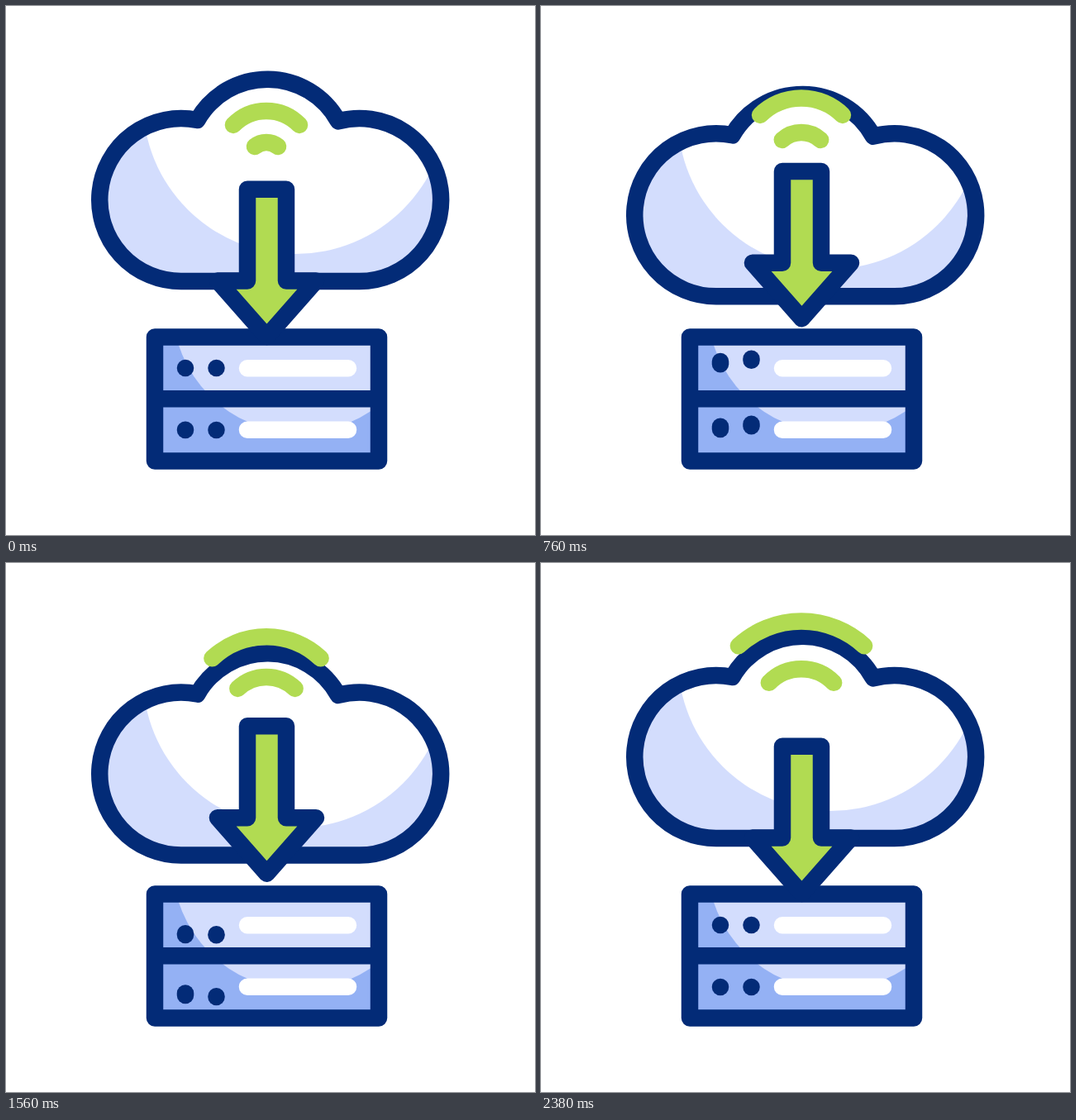
An HTML page that plays this animation: 640x640 px, repeating every 2400 ms.

```html
<!DOCTYPE html>
<html lang="en">
<head>
<meta charset="utf-8">
<title>Cloud download</title>
<style>
  html, body { margin: 0; width: 100%; height: 100%; overflow: hidden; background: #fff; }
  svg { display: block; width: 100vw; height: 100vh; }
  .line { fill: none; stroke: #032b77; stroke-width: 20.5; stroke-linejoin: round; stroke-linecap: round; }
  .white { stroke: #fff; }
  .green { stroke: #b1db52; }
  .light { fill: #d3ddfd; }
  .dark { fill: #94b1f4; }
</style>
</head>
<body>
<svg viewBox="0 0 640 640">
  <defs>
    <path id="outline" d="M212.5 333A98.5 98.5 0 1 1 231.5 138A97.7 97.7 0 0 1 402 139.4A98.5 98.5 0 1 1 427.5 333Z"/>
    <clipPath id="inCloud"><use href="#outline"/></clipPath>
    <clipPath id="inServer"><path d="M180 400.5H451V550.5H180Z"/></clipPath>
  </defs>

  <g id="cloud">
    <g clip-path="url(#inCloud)">
      <rect class="light" x="100" y="70" width="440" height="280"/>
      <circle cx="350" cy="115.6" r="184.4" fill="#fff"/>
    </g>
    <use href="#outline" class="line"/>
  </g>

  <path id="outerWave" class="line green"/>
  <path id="innerWave" class="line green"/>

  <g clip-path="url(#inServer)">
    <rect class="dark" x="180" y="400" width="271" height="151"/>
    <circle class="light" cx="355" cy="363" r="153.5"/>
  </g>
  <path class="line" d="M180 400.5H451V550.5H180ZM180 475.3H451"/>
  <path class="line white" d="M292 438.2H414M292 512.7H414"/>
  <g id="dots"></g>

  <path id="arrow" class="line" style="fill:#b1db52"
        d="M292 221.7H339V332.5H375L315.5 400L256 332.5H292Z"/>
</svg>
<script>
const LOOP = 2400, BEAT = 600, SMEAR = 40;
const $ = id => document.getElementById(id);
const clamp = x => Math.min(1, Math.max(0, x));
const mix = (a, b, p) => a + (b - a) * p;

// Closed form of cubic-bezier(.5, 0, .5, 1)
function ease(x) {
  const s = 0.5 + Math.sinh(Math.asinh(4 * clamp(x) - 2) / 3);
  return s * s * (3 - 2 * s);
}

// Arc poses: half width, height of the ends, height of the top
const SMALL = [14, 170, 165], MEDIUM = [40, 144, 127], WIDE = [48.3, 140, 120], LARGE = [77, 99, 69];
const innerEnds = [MEDIUM, WIDE, WIDE, MEDIUM];

function drawWave(el, from, to, p) {
  const [w, end, top] = from.map((v, i) => mix(v, to[i], p));
  const sag = end - top, r = (w * w + sag * sag) / (2 * sag);
  el.setAttribute('d', `M${315 - w} ${end}A${r} ${r} 0 0 1 ${315 + w} ${end}`);
}

// Each light rises, sinks and returns: times of the four turns, then the two extremes
const dots = [
  { x: 217, y: 438, times: [40, 345, 1445, 1950], up: -13.5, down: 12.5 },
  { x: 254.5, y: 438, times: [120, 531, 1474, 2000], up: -13, down: 12.5 },
  { x: 217, y: 512.9, times: [20, 230, 1390, 1900], up: -12.5, down: 11.5 },
  { x: 254.5, y: 512.9, times: [40, 330, 1510, 1980], up: -12, down: 12 }
];
for (const dot of dots) {
  dot.el = document.createElementNS('http://www.w3.org/2000/svg', 'path');
  dot.el.setAttribute('class', 'line');
  $('dots').append(dot.el);
}

function dotY({ y, times, up, down }, t) {
  const stops = [0, up, down, 0];
  for (let i = 0; i < 3; i++) {
    const p = (t - times[i]) / (times[i + 1] - times[i]);
    y += (stops[i + 1] - stops[i]) * ease(p);
  }
  return y;
}

function draw(now) {
  const t = now % LOOP;
  const swing = ease(1 - Math.abs(t / (LOOP / 2) - 1));
  $('cloud').setAttribute('transform', `translate(0 ${24.5 * swing})`);
  $('arrow').setAttribute('transform', `translate(0 ${-29 * swing})`);

  // The first pulse holds its last pose briefly
  const beat = t < BEAT + 20 ? 0 : Math.floor(t / BEAT);
  const p = clamp(t / BEAT - beat);
  drawWave($('innerWave'), SMALL, innerEnds[beat], p);
  drawWave($('outerWave'), innerEnds[(beat + 3) % 4], LARGE, p);

  for (const dot of dots) {
    dot.el.setAttribute('d', `M${dot.x} ${dotY(dot, t - SMEAR)}V${dotY(dot, t + SMEAR)}`);
  }
}

function tick() {
  draw(performance.now());
  requestAnimationFrame(tick);
}
tick();
</script>
</body>
</html>
```
